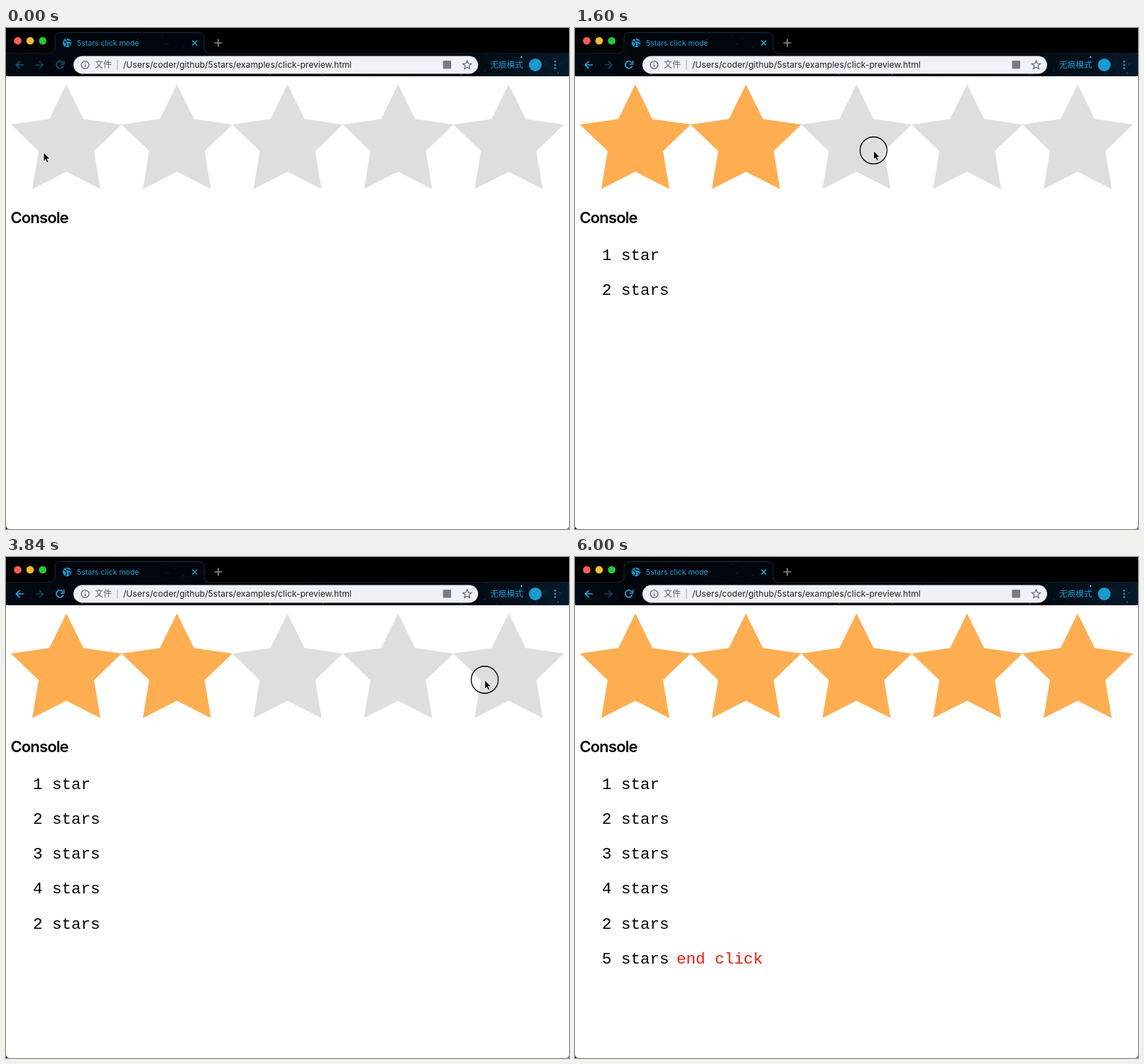
An HTML page for the animation above (6.08 s loop, 793x706 px).

```html
<!DOCTYPE html>
<html lang="en">
<head>
<meta charset="utf-8">
<title>5stars click mode</title>
<style>
  html, body { margin: 0; height: 100%; overflow: hidden; background: #fff; }
  svg { display: block; }
  text { font-family: Inter, "Noto Sans CJK SC", "Noto Sans CJK", sans-serif; white-space: pre; }
  .log text { font: 22.5px "Liberation Mono", monospace; }
  .icon { fill: none; stroke-width: 1.7; }
</style>
</head>
<body>
<svg width="793" height="706" viewBox="0 0 793 706">
  <defs>
    <linearGradient id="bar">
      <stop offset="0" stop-color="#020a12"/>
      <stop offset=".12" stop-color="#01060c"/>
      <stop offset=".8" stop-color="#02080f"/>
      <stop offset="1" stop-color="#061a2a"/>
    </linearGradient>
    <path id="star" d="M85 79.5 109 128.3 163 136 124 173.5 133 227 85 202.5 37 227 46 173.5 7 136 61 128.3Z"/>
  </defs>

  <rect width="793" height="36" fill="#000"/>
  <rect y="35.5" width="793" height="32.5" fill="url(#bar)"/>
  <path d="M61 35.5q8 0 8-8V14.5q0-8 8-8H271q8 0 8 8V27.5q0 8 8 8" fill="#01060c" stroke="#15303f"/>
  <path d="M0 35.5H61M287 35.5H793" stroke="#0c1a24"/>
  <g id="specks" fill="#6fb4d6"></g>

  <circle cx="16.5" cy="18" r="5.3" fill="#ff5f57"/>
  <circle cx="34" cy="18" r="5.3" fill="#febc2e"/>
  <circle cx="51.7" cy="18" r="5.3" fill="#28c840"/>

  <circle cx="86" cy="21" r="6.2" fill="#189bd0"/>
  <path d="M81 19q3 0 4 2.500t-1 4.500M85 15.500q0 3 3 3t3.500 2M88 22.500l2 .5-1 2.500" fill="none" stroke="#01060c" stroke-width="1.4"/>
  <text x="100" y="24.700" font-size="10.500" fill="#1ca9e0">5stars click mode</text>
  <path d="M262.300 17.500l7 7m0-7l-7 7" class="icon" stroke="#1ca9e0" style="stroke-width:1.500"/>
  <path d="M299 15.500v11m-5.500-5.500h11" class="icon" stroke="#8b8b8b"/>

  <path id="back" d="M25 52H14.500m5-5.200L14.300 52l5.200 5.200" class="icon"/>
  <path d="M41.500 52H52m-5-5.200L52.200 52 47 57.200" class="icon" stroke="#0b455f"/>
  <g id="reload">
    <path d="M80.200 49.200A5 5 0 1 0 80.600 53.400" class="icon"/>
    <path d="M81.600 46v5h-5" class="icon" style="stroke-width:1.500"/>
  </g>

  <rect x="95" y="39.500" width="570" height="25" rx="12.500" fill="#eef1f5"/>
  <circle cx="111.500" cy="52" r="5.400" fill="none" stroke="#5f6368" stroke-width="1.300"/>
  <path d="M111.500 51.300v3.700m0-6.200v1.300" stroke="#5f6368" stroke-width="1.300"/>
  <text x="125" y="56.300" font-size="12" fill="#5f6368">文件</text>
  <path d="M157 45v14" stroke="#aab0b7"/>
  <text x="165" y="56.200" font-size="12.100" fill="#202124">/Users/coder/github/5stars/examples/click-preview.html</text>
  <rect x="615.500" y="46" width="11.500" height="11.500" rx="1" fill="#777c82"/>
  <path d="M649.500 46l1.700 4 4.300.4-3.300 2.800 1 4.200-3.700-2.200-3.700 2.200 1-4.200-3.300-2.800 4.300-.4z" fill="none" stroke="#5f6368" stroke-width="1.200"/>
  <text x="682" y="56" font-size="11.600" fill="#189bd0">无痕模式</text>
  <circle cx="745.500" cy="52" r="9" fill="#189bd0"/>
  <g fill="#189bd0">
    <circle cx="773.500" cy="47.300" r="1.400"/><circle cx="773.500" cy="52" r="1.400"/><circle cx="773.500" cy="56.700" r="1.400"/>
  </g>

  <g id="stars"></g>
  <text x="6.500" y="275.300" font-size="22" font-weight="600" letter-spacing="-.04em">Console</text>
  <g id="log" class="log"></g>

  <path d="M0 701q0 5 5 5H0z" fill="#000"/>
  <path d="M793 701q0 5-5 5h5z" fill="#1688b5"/>

  <g id="pointer">
    <circle id="ring" r="19" fill="none" stroke="#000" stroke-width="1.300"/>
    <path d="M0 .5V13l2.900-2.600 1.900 4.300 2.200-.9-1.900-4.300H9z" fill="#000" stroke="#fff" stroke-width=".9"/>
  </g>
</svg>
<script>
const LOOP = 6080, STEP = 80, RING_TIME = 160;
const $ = id => document.getElementById(id);

// Each click: time the rating changes, new rating.
const clicks = [[320, 1], [1120, 2], [1680, 3], [2160, 4], [2880, 2], [3920, 5]];

// Pointer stops: time, x, y.
const stops = [
  [0, 53, 175], [160, 58, 174], [320, 56, 174], [400, 55, 174], [800, 258, 176],
  [1120, 258, 176], [1440, 420.5, 172.5], [1680, 420.5, 172.5], [2000, 520, 176],
  [2160, 520, 176], [2480, 226, 180], [2960, 226, 180], [3440, 674.3, 173],
  [4480, 674.3, 173], [4960, 438, 183], [5040, 438, 183], [5360, 470, -30], [LOOP, 470, -30]
];

function add(parent, name, attrs, content = '') {
  const el = document.createElementNS('http://www.w3.org/2000/svg', name);
  for (const key in attrs) el.setAttribute(key, attrs[key]);
  el.textContent = content;
  return parent.appendChild(el);
}

let seed = 7;
const random = () => (seed = seed * 16807 % 2147483647) / 2147483647;
for (let i = 0; i < 46; i++) {
  const inTab = i < 14;
  add($('specks'), 'circle', {
    cx: inTab ? 130 + random() * 130 : 668 + random() * 124,
    cy: inTab ? 9 + random() * 25 : 37 + random() * 30,
    r: 0.3 + random() * 0.4, opacity: 0.15 + random() * 0.5
  });
}
for (const x of [107, 372, 447, 641]) add($('specks'), 'circle', { cx: x, cy: 66, r: 0.8, opacity: 0.7 });
add($('specks'), 'circle', { cx: 726, cy: 41, r: 1.2 });

const stars = [0, 1, 2, 3, 4].map(i => add($('stars'), 'use', { href: '#star', x: i * 155.75 }));

const lines = clicks.map(([, rating], i) => {
  const line = add($('log'), 'g', {}), y = 326.6 + i * 49.25;
  add(line, 'text', { x: 38, y }, `${rating} star${rating > 1 ? 's' : ''}`);
  if (rating === 5) add(line, 'text', { x: 143, y, fill: '#ee1c0c' }, 'end click');
  return line;
});

function pointerAt(t) {
  const i = stops.findIndex(stop => stop[0] > t);
  const [t0, x0, y0] = stops[i - 1], [t1, x1, y1] = stops[i];
  const p = (t - t0) / (t1 - t0), ease = p * p * (3 - 2 * p);
  return [x0 + (x1 - x0) * ease, y0 + (y1 - y0) * ease];
}

const show = (el, visible) => el.setAttribute('visibility', visible ? 'visible' : 'hidden');

function draw(now) {
  const t = Math.floor(now % LOOP / STEP) * STEP;
  const done = clicks.filter(([time]) => time <= t);
  const rating = done.length ? done[done.length - 1][1] : 0;
  stars.forEach((star, i) => star.setAttribute('fill', i < rating ? '#ffad51' : '#dedede'));
  lines.forEach((line, i) => show(line, i < done.length));
  for (const id of ['back', 'reload']) $(id).setAttribute('stroke', rating ? '#1ca9e0' : '#0b5c80');
  show($('ring'), clicks.some(([time]) => t >= time - RING_TIME && t < time));
  $('pointer').setAttribute('transform', `translate(${pointerAt(t)})`);
}

const start = performance.now();
function frame() {
  draw(performance.now() - start);
  requestAnimationFrame(frame);
}
frame();
</script>
</body>
</html>
```
